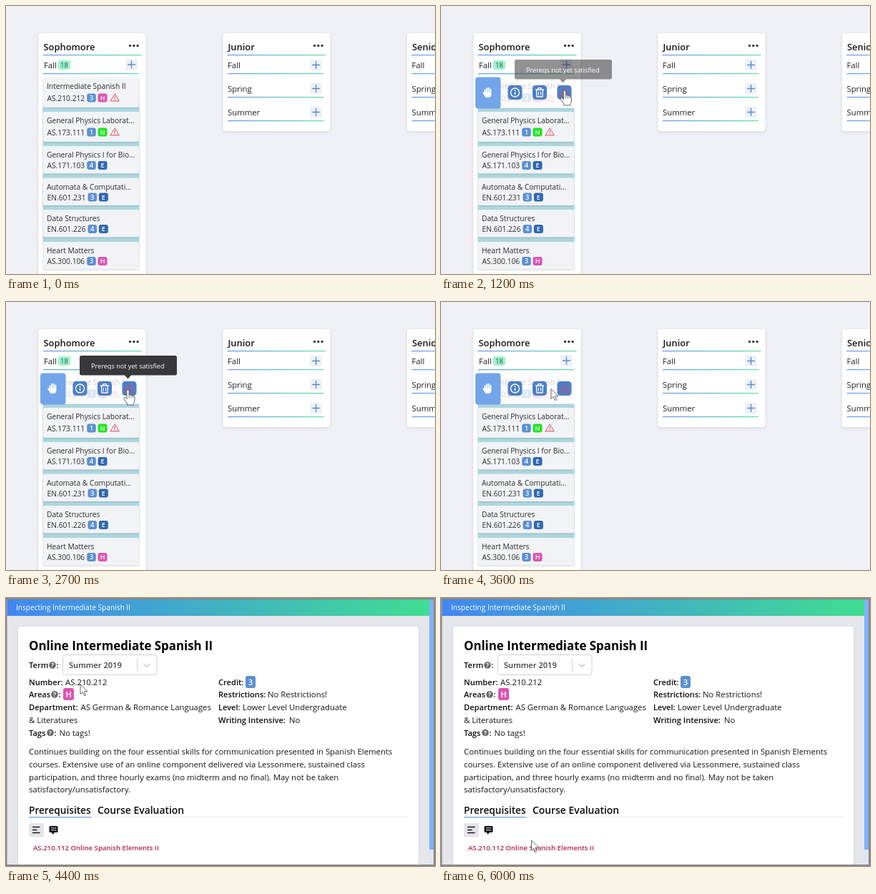
Recreate the animation shown at these times as an HTML page with a canvas. Size 600 by 375 pixels, loop 6.1 s.

```html
<!DOCTYPE html>
<html lang="en">
<head>
<meta charset="utf-8">
<title>Course planner</title>
<style>
html, body { margin: 0; width: 100%; height: 100%; overflow: hidden; background: #f0f1f6; }
canvas { display: block; width: 600px; height: 375px; }
</style>
</head>
<body>
<canvas id="stage" width="600" height="375"></canvas>
<script>
const ctx = document.getElementById('stage').getContext('2d');
const LOOP = 6100, STEP = 100, MODAL_AT = 4400;
const FONT = '"Open Sans", "Noto Sans", sans-serif';
const BLUE = '#5b8fd2', PINK = '#dc55b0', GREEN = '#1fe41f', NAVY = '#2f68b0', RED = '#e0455f';

const clamp = v => Math.max(0, Math.min(1, v));
const ramp = (t, a, b) => clamp((t - a) / (b - a));
const ease = p => p * p * (3 - 2 * p);

function box(x, y, w, h, r, fill) {
  ctx.beginPath();
  ctx.roundRect(x, y, w, h, r);
  ctx.fillStyle = fill;
  ctx.fill();
}

function shadowBox(x, y, w, h, r, fill, blur, alpha) {
  ctx.save();
  ctx.shadowColor = `rgba(40,50,80,${alpha})`;
  ctx.shadowBlur = blur;
  ctx.shadowOffsetY = 1;
  box(x, y, w, h, r, fill);
  ctx.restore();
}

function text(s, x, y, size, color = '#1f2023', weight = 400, align = 'left') {
  ctx.font = `${weight} ${size}px ${FONT}`;
  ctx.textAlign = align;
  ctx.fillStyle = color;
  ctx.fillText(s, x, y);
}

function stroke(color, width, points, close) {
  ctx.beginPath();
  points.forEach(([x, y]) => ctx.lineTo(x, y));
  if (close) ctx.closePath();
  ctx.strokeStyle = color;
  ctx.lineWidth = width;
  ctx.lineJoin = ctx.lineCap = 'round';
  ctx.stroke();
}

function disc(x, y, r, fill) {
  ctx.beginPath();
  ctx.arc(x, y, r, 0, 7);
  ctx.fillStyle = fill;
  ctx.fill();
}

function fade(x0, x1, from, to) {
  const g = ctx.createLinearGradient(x0, 0, x1, 0);
  g.addColorStop(0, from);
  g.addColorStop(1, to);
  return g;
}

function rule(x, y, w) {
  box(x, y, w, 1.3, 0, fade(x, x + w, '#6a9af0', '#5fe0a8'));
}

function badge(s, x, y, w, h, fill, size) {
  box(x, y, w, h, 3, fill);
  text(s, x + w / 2, y + h / 2 + size * 0.36, size, '#fff', 600, 'center');
}

function warning(x, y, s, color = RED) {
  stroke(color, 1, [[x, y - 5 * s], [x + 6 * s, y + 5 * s], [x - 6 * s, y + 5 * s]], true);
  stroke(color, 1, [[x, y - 1.3 * s], [x, y + 1.3 * s]]);
  disc(x, y + 3.1 * s, 0.7, color);
}

function plus(x, y) {
  box(x - 8.5, y - 8, 17, 16, 3, '#eff1f5');
  stroke(BLUE, 1.5, [[x - 5, y], [x + 5, y]]);
  stroke(BLUE, 1.5, [[x, y - 5], [x, y + 5]]);
}

function semester(name, x, y) {
  text(name, x + 6, y + 4, 11.3);
  plus(x + 129.5, y - 0.5);
  rule(x + 6, y + 11, 134);
}

function column(title, x, h) {
  shadowBox(x, 38, 150, h, 3, '#fff', 4, 0.15);
  text(title, x + 7, 62, 12.9, '#151618', 600);
  for (let i = 0; i < 3; i++) disc(x + 128 + i * 5.3, 55.5, 1.6, '#1b1b1d');
  rule(x + 6, 68, 138);
}

const courses = [
  ['Intermediate Spanish II', 'AS.210.212', 100, 42, 3, 'H', PINK, true],
  ['General Physics Laborat…', 'AS.173.111', 148, 42, 1, 'N', GREEN, true],
  ['General Physics I for Bio…', 'AS.171.103', 196, 38.5, 4, 'E', NAVY],
  ['Automata & Computati…', 'EN.601.231', 240.5, 38.5, 3, 'E', NAVY],
  ['Data Structures', 'EN.601.226', 285, 38.5, 4, 'E', NAVY],
  ['Heart Matters', 'AS.300.106', 330, 38.5, 3, 'H', PINK]
];

function card([name, code, y, h, credit, area, color, warn]) {
  shadowBox(51.5, y, 135, h, 3, '#f2f3f6', 2, 0.22);
  const base = y + (h > 40 ? 16 : 16.3);
  text(name, 57, base, 10.25, '#2b2c30');
  const second = base + (h > 40 ? 16.5 : 14.7);
  text(code, 57.5, second, 10.25, '#2b2c30');
  const bx = 58 + ctx.measureText(code).width + 2.5;
  badge(credit, bx, second - 10, 12.5, 12, BLUE, 9.5);
  badge(area, bx + 15.3, second - 10, 13, 12, color, 9);
  if (warn) warning(bx + 39, second - 4.6, 1);
}

function board() {
  box(0, 0, 600, 375, 0, '#f0f1f6');
  column('Sophomore', 45.5, 350);
  text('Fall', 53, 87, 11.3);
  box(73, 76, 17, 13, 3.5, '#9df0cb');
  text('18', 81.5, 86, 9, '#2d4a40', 400, 'center');
  plus(175.5, 82);
  rule(52, 94, 134);
  box(51.5, 138, 135, 196, 0, '#acd7df');
  courses.forEach(card);
  [['Junior', 303.5], ['Senior', 561]].forEach(([name, x]) => {
    column(name, x, 137);
    ['Fall', 'Spring', 'Summer'].forEach((s, i) => semester(s, x + 0.5, 83 + i * 33));
  });
}

function palm(x, y) {
  [[-4, -3.5], [-1.5, -6], [1.2, -6], [3.8, -4.2]].forEach(([dx, dy]) =>
    stroke('#fff', 2, [[x + dx, y + dy], [x + dx, y + 2]]));
  stroke('#fff', 2, [[x - 6.3, y + 0.5], [x - 3.5, y + 4]]);
  box(x - 5, y - 0.5, 9.8, 7.5, [1, 1, 4, 4], '#fff');
}

function infoIcon(x, y) {
  ctx.beginPath();
  ctx.arc(x, y, 6, 0, 7);
  ctx.strokeStyle = '#fff';
  ctx.lineWidth = 1.4;
  ctx.stroke();
  stroke('#fff', 1.5, [[x, y - 0.3], [x, y + 2.8]]);
  disc(x, y - 2.8, 0.9, '#fff');
}

function trash(x, y) {
  stroke('#fff', 1.4, [[x - 5.5, y - 4], [x + 5.5, y - 4]]);
  stroke('#fff', 1.2, [[x - 2, y - 4.5], [x - 2, y - 6.3], [x + 2, y - 6.3], [x + 2, y - 4.5]]);
  stroke('#fff', 1.3, [[x - 4.3, y - 3.5], [x - 4, y + 6], [x + 4, y + 6], [x + 4.3, y - 3.5]]);
  [-1.5, 1.5].forEach(d => stroke('#fff', 1, [[x + d, y - 1], [x + d, y + 3.5]]));
}

function actions(alpha) {
  if (!alpha) return;
  ctx.save();
  ctx.globalAlpha = alpha;
  box(48, 99, 142, 44, 4, 'rgba(255,255,255,.78)');
  box(48, 99.5, 35.5, 44, 4, '#72a5ea');
  palm(65.5, 121);
  [103.5, 138, 172.5].forEach(x => box(x - 10, 111, 20, 20, 4.5, '#4c7fc6'));
  infoIcon(103.5, 121);
  trash(138, 121);
  warning(172.5, 120.5, 1.1);
  ctx.restore();
}

function tooltip(alpha) {
  if (!alpha) return;
  ctx.save();
  ctx.globalAlpha = alpha;
  ctx.beginPath();
  ctx.roundRect(103, 75, 136, 27.5, 2.5);
  ctx.moveTo(165.5, 102);
  ctx.lineTo(175.5, 102);
  ctx.lineTo(170.5, 107.5);
  ctx.fillStyle = '#353436';
  ctx.fill();
  ctx.restore();
  text('Prereqs not yet satisfied', 119, 93, 9.15, '#fff');
}

function help(x, y) {
  disc(x, y, 4.8, '#66686c');
  text('?', x, y + 3, 8.5, '#fff', 700, 'center');
}

function modal() {
  box(0, 0, 600, 375, 0, '#85878b');
  box(1.5, 2, 596.5, 371, 0, '#e5e7ec');
  box(1.5, 2, 590.5, 23, 0, fade(0, 592, '#4286f2', '#40dd92'));
  text('Inspecting Intermediate Spanish II', 14, 17.3, 10.1, '#fff', 500);
  box(592, 2, 6, 350, 0, '#7fb2fb');
  box(592, 352, 6, 21, 0, '#dfe6f1');
  shadowBox(17, 40, 560, 333, [4, 4, 0, 0], '#fff', 4, 0.1);
  box(0, 373, 600, 2, 0, '#85878b');

  text('Online Intermediate Spanish II', 32, 72.5, 16.85, '#000', 700);
  const bold = (s, x, y) => text(s, x, y, 11.1, '#0c0c0e', 600);
  const plain = (s, x, y) => text(s, x, y, 11.33, '#141517');

  bold('Term', 32, 98);
  help(65, 94);
  bold(':', 70.5, 98);
  ctx.beginPath();
  ctx.roundRect(79.5, 79.5, 131.5, 28, 3);
  ctx.strokeStyle = '#d0d2d6';
  ctx.lineWidth = 1;
  ctx.stroke();
  text('Summer 2019', 88, 98, 11.1, '#3d3f43', 600);
  stroke('#d0d2d6', 1, [[183.5, 86], [183.5, 102]]);
  stroke('#c3c5ca', 1.4, [[193.3, 92.5], [197, 96.2], [200.7, 92.5]]);

  bold('Number:', 32, 121.5);
  plain('AS.210.212', 83, 121.5);
  bold('Areas', 32, 139);
  help(68, 135);
  bold(':', 73.5, 139);
  badge('H', 80, 126, 15, 17, PINK, 11.3);
  bold('Department:', 32, 157);
  plain('AS German & Romance Languages', 104.5, 157);
  plain('& Literatures', 32, 175);
  bold('Tags', 32, 192.5);
  help(62, 188.5);
  bold(':', 67.5, 192.5);
  plain('No tags!', 74.5, 192.5);

  bold('Credit:', 297, 121.5);
  badge('3', 335, 109, 14, 17, BLUE, 11.3);
  bold('Restrictions:', 297, 139);
  plain('No Restrictions!', 366, 139);
  bold('Level:', 297, 157);
  plain('Lower Level Undergraduate', 331, 157);
  bold('Writing Intensive:', 297, 175);
  plain('No', 396, 175);

  [
    'Continues building on the four essential skills for communication presented in Spanish Elements',
    'courses. Extensive use of an online component delivered via Lessonmere, sustained class',
    'participation, and three hourly exams (no midterm and no final). May not be taken',
    'satisfactory/unsatisfactory.'
  ].forEach((s, i) => plain(s, 32, 219 + i * 17.8));

  text('Prerequisites', 32, 302, 13.65, '#0c0c0e', 600);
  text('Course Evaluation', 128, 302, 13.9, '#0c0c0e', 600);
  box(32, 306, 531, 1, 0, '#e6e7eb');
  box(32, 306, 87, 1.4, 0, '#84aee8');

  box(32, 315, 21, 19.5, 3, '#e4e5e8');
  [[320.5, 9.5], [324.5, 5.5], [328.5, 9.5]].forEach(([y, w]) =>
    stroke('#1b1b1d', 1.3, [[37.5, y], [37.5 + w, y]]));
  box(60.5, 319, 12, 9, 1.5, '#111');
  ctx.beginPath();
  ctx.moveTo(63.5, 327);
  ctx.lineTo(68.5, 327);
  ctx.lineTo(65.5, 331);
  ctx.fill();
  [321.8, 324.8].forEach(y => stroke('#fff', 0.9, [[63, y], [70, y]]));
  text('AS.210.112 Online Spanish Elements II', 38, 353, 9.65, '#b3204a', 600);
}

// time, x, y of the pointer tip
const path = [
  [600, -14, 150], [1100, 173, 118], [1400, 173, 118], [2000, 170.5, 123],
  [2700, 170.5, 123], [3000, 171, 124], [3400, 170, 124], [3600, 154, 122],
  [4100, 103, 117], [4300, 102.5, 117.5], [4400, 104, 121], [4700, 104, 121],
  [5400, 122, 333], [5600, 122, 333], [6000, 126.5, 339.5]
];

function pointer(t) {
  const i = path.findIndex(p => p[0] > t);
  if (i === 0) return path[0].slice(1);
  if (i < 0) return path[path.length - 1].slice(1);
  const [a, x0, y0] = path[i - 1], [b, x1, y1] = path[i];
  const p = ease(ramp(t, a, b));
  return [x0 + (x1 - x0) * p, y0 + (y1 - y0) * p];
}

const arrow = new Path2D('M0 0V13.5L3.2 10.6L5.4 15.8L7.5 14.9L5.4 9.8H9.6Z');
const hand = new Path2D('M-1.6 1.2Q0 -1 1.6 1.2V7Q3.4 5.8 4.4 7.6Q6.2 6.6 7 8.4Q9 7.6 9.4 10V15Q9 18 7.6 19V21H-1V19L-5.6 12.4Q-6 10 -3.8 10.4L-1.6 12.4Z');

function cursor(t) {
  const isHand = t >= 1050 && t < 3500 || t >= 4000 && t < MODAL_AT;
  const shape = isHand ? hand : arrow;
  ctx.save();
  ctx.translate(...pointer(t));
  ctx.fillStyle = '#fff';
  ctx.strokeStyle = '#55565c';
  ctx.lineWidth = 0.9;
  ctx.lineJoin = 'round';
  ctx.fill(shape);
  ctx.stroke(shape);
  if (isHand) [1.6, 4.4, 7].forEach((x, i) => stroke('#55565c', 0.8, [[x, 7 + i * 0.7], [x, 11]]));
  ctx.restore();
}

function draw(now) {
  const t = Math.floor(now % LOOP / STEP) * STEP;
  if (t < MODAL_AT) {
    board();
    actions(ramp(t, 750, 1000));
    tooltip(0.98 * Math.min(ramp(t, 1090, 1290), 1 - ramp(t, 3350, 3550)));
  } else {
    modal();
  }
  cursor(t);
}

const start = performance.now();
function tick() {
  draw(performance.now() - start);
  requestAnimationFrame(tick);
}
tick();
</script>
</body>
</html>
```
